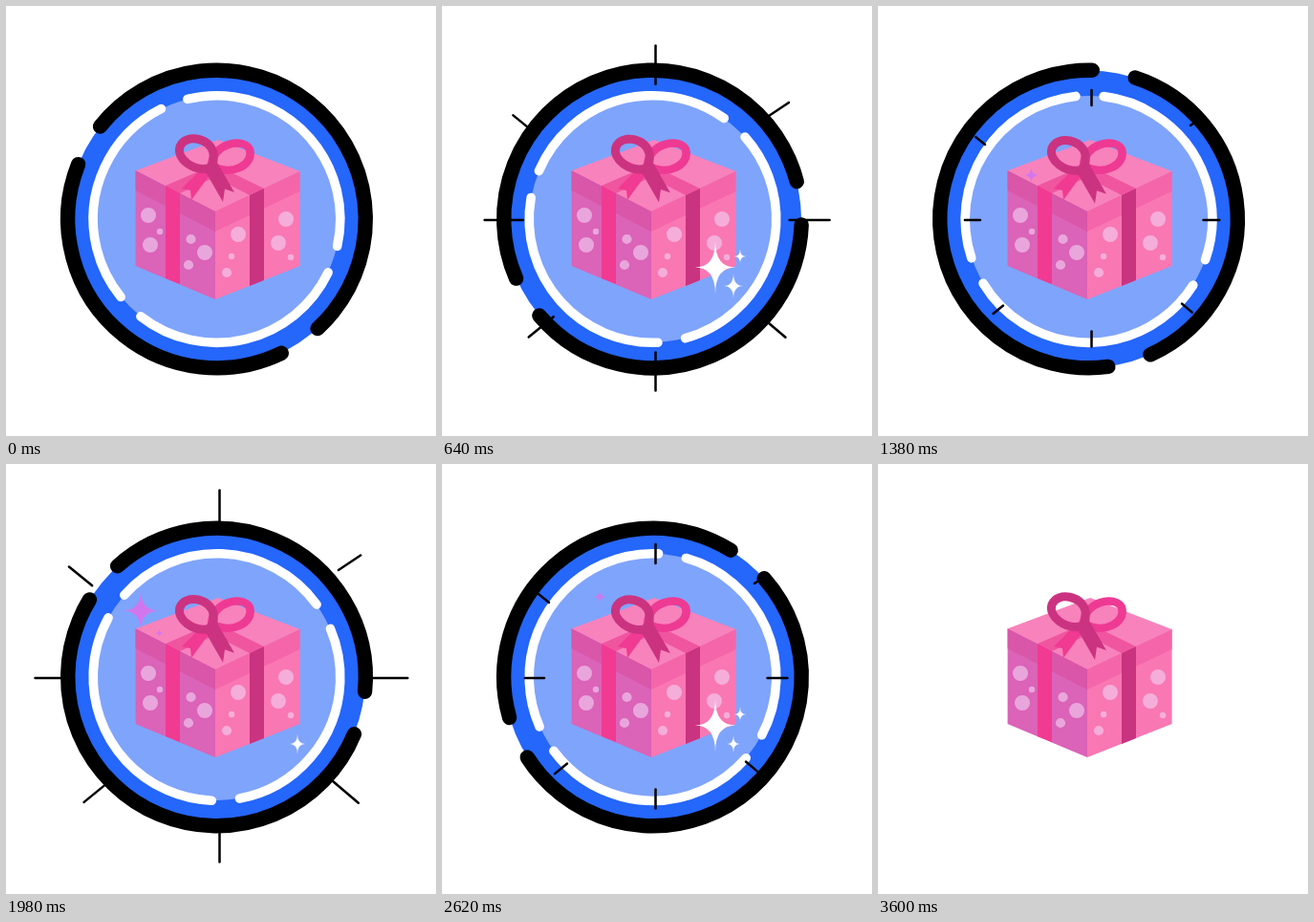
Animation, 450 px wide and 450 px high, one loop 3620 ms. Source, as an HTML page:

```html
<!DOCTYPE html>
<html lang="en">
<head>
<meta charset="utf-8">
<title>Gift badge</title>
<style>
html, body { margin: 0; width: 100%; height: 100%; overflow: hidden; background: #fff; }
svg { display: block; width: 100vw; height: 100vh; }
.line { fill: none; stroke-linecap: round; }
</style>
</head>
<body>
<svg viewBox="0 0 450 450">
  <g id="badge">
    <circle cx="220.5" cy="223" r="155.5" fill="#2566fb"/>
    <circle cx="220.5" cy="223" r="129" fill="#7fa4fb"/>
    <g class="line">
      <circle id="outer" cx="220.5" cy="223" r="155.8" pathLength="360" stroke="#000" stroke-width="15.4" stroke-dasharray="188.9 16.8 137.4 16.9"/>
      <circle id="inner" cx="220.5" cy="223" r="129.3" pathLength="360" stroke="#fff" stroke-width="9.6" stroke-dasharray="116.4 12.9 102.4 12.9 102.4 13"/>
    </g>
    <g id="rays" class="line" stroke="#000" stroke-width="2.5">
      <path pathLength="1" d="M223.5 104V23.5"/>
      <path pathLength="1" d="M327 125 373.5 94"/>
      <path pathLength="1" d="M340.5 224H424.5"/>
      <path pathLength="1" d="M318 311.5 371.5 357"/>
      <path pathLength="1" d="M223.5 340.5V420.5"/>
      <path pathLength="1" d="M131 313.5 79 356"/>
      <path pathLength="1" d="M107 224H26.5"/>
      <path pathLength="1" d="M112 145 63.5 105.5"/>
    </g>
  </g>

  <g id="gift">
    <path fill="#f882bc" d="M135.6 172.3 222 140 307.6 173 219 216z"/>
    <path fill="#db63b8" d="M135.6 172.3 219 215V307L135.6 272z"/>
    <path fill="#f977b3" d="M219 215 307.6 173V272L219 307z"/>
    <path fill="#d956a8" d="M135.6 172.3 219 215V236L135.6 193z"/>
    <path fill="#f466a9" d="M219 215 307.6 173V194L219 236z"/>
    <path fill="#f0559f" d="M167 188 204 172 219 179 182 196zM255 198 214 177 227 170 270 191z"/>
    <path fill="#f13a92" d="M167 188 182 196V291L167 285z"/>
    <path fill="#c93380" d="M255 198 270 191V287L255 293z"/>
    <g class="line" stroke="#f3d0f2" opacity=".62">
      <path stroke-width="16" d="M149 219h0M151 250h0M208 258h0M293 223h0M243 239h0M285 248h0"/>
      <path stroke-width="10.2" d="M193.5 244h0M191 271h0M231 279h0"/>
      <path stroke-width="6.4" d="M161 236h0M236 262h0M298 263h0"/>
    </g>
    <path class="line" stroke="#ee3a93" stroke-width="8.5" d="M215 167C216 144 248 137 255 150C260 166 236 179 215 167z"/>
    <path fill="#f13a92" d="M203 172 213 177 194 203 193 193 184 191z"/>
    <g id="bow" fill="#cb3381">
      <path class="line" stroke="#cb3381" stroke-width="9" d="M212 170C196 173 178 160 182 147C188 133 214 138 217 154C218 164 216 168 212 170z"/>
      <path d="M211 164 220 162 239 195 229 191.500 227 205 208 172z"/>
    </g>
  </g>

  <g id="stars"/>
</svg>
<script>
const LOOP = 3620, END = 3600;
const $ = id => document.getElementById(id);
const clamp = v => Math.max(0, Math.min(1, v));

// Stars of one group pop up one after another; each spot is x, y, half height.
function starGroup(fill, aspect, first, delay, period, spots) {
  return spots.map(([x, y, r], i) => {
    const el = document.createElementNS("http://www.w3.org/2000/svg", "path");
    el.setAttribute("d", "M0-1Q0 0 1 0Q0 0 0 1Q0 0-1 0Q0 0 0-1z");
    el.setAttribute("fill", fill);
    $("stars").append(el);
    return t => {
      const age = t % period - first - i * delay;
      const size = r * clamp(Math.min(age, 900 - age) / 180);
      el.setAttribute("transform", `translate(${x} ${y}) scale(${size * aspect} ${size})`);
    };
  });
}

const stars = [
  ...starGroup("#fff", .76, 40, 200, 1800, [[305, 293, 13.5], [286, 273.5, 28], [312, 262, 8]]),
  ...starGroup("#d276ee", .95, 1180, 400, END, [[160.5, 177, 8.5], [141, 153.5, 21], [165, 139, 7]])
];

function draw(time) {
  const t = Math.max(20, Math.floor(time % LOOP / 20) * 20);
  const playing = t < END;
  $("badge").style.display = $("stars").style.display = playing ? "" : "none";

  $("outer").setAttribute("transform", `rotate(${-139.5 - t / 10} 220.5 223)`);
  $("inner").setAttribute("transform", `rotate(${254.3 + t / 10} 220.5 223)`);

  // Each ray grows outwards, then its inner end catches up.
  const phase = (t - 20) % 1200;
  const head = clamp(phase / 800), tail = clamp((phase - 400) / 800);
  const rays = $("rays").style;
  rays.visibility = head > tail ? "" : "hidden";
  rays.strokeDasharray = `${head - tail} 2`;
  rays.strokeDashoffset = -tail;

  const drop = playing ? 1.5 * (1 - Math.cos(Math.PI * clamp(t / 2500))) : 0;
  $("bow").setAttribute("transform", `translate(0 ${drop})`);

  stars.forEach(update => update(t));
}

const start = performance.now();
(function tick() {
  draw(performance.now() - start);
  requestAnimationFrame(tick);
})();
</script>
</body>
</html>
```
